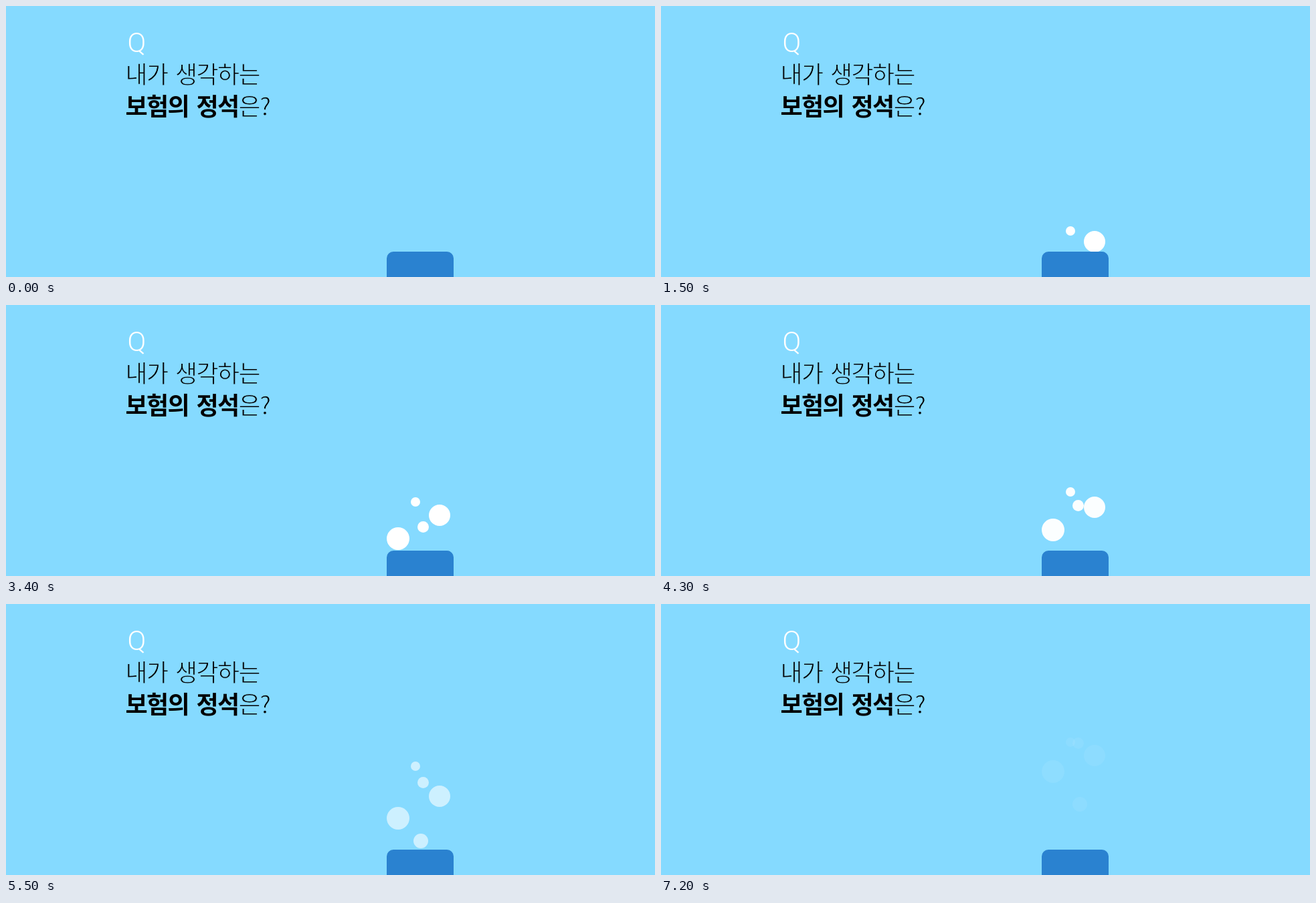
Write an HTML page that moves like this. It is 970 by 406 pixels and loops after 7.5 s.

```html
<!DOCTYPE html>
<html lang="ko">
<head>
<meta charset="utf-8">
<style>
  html, body { margin: 0; width: 100%; height: 100%; overflow: hidden; background: #85daff; }
  svg { display: block; }
  .title { font: 400 36px "Noto Sans CJK KR", "Noto Sans CJK JP", "Noto Sans CJK", sans-serif;
    letter-spacing: -1.6px; word-spacing: 3px; stroke: #85daff; stroke-width: 1px; }
  .title .bold { font-weight: 700; stroke: none; }
  .mark { font: 300 41px Roboto, sans-serif; font-stretch: 75%; fill: #fff; text-anchor: middle; }
</style>
</head>
<body>
<svg width="970" height="406" viewBox="0 0 970 406">
  <text class="mark" x="195.5" y="68.5">Q</text>
  <text class="title" x="178.5" y="116">내가 생각하는</text>
  <text class="title" x="178.5" y="164"><tspan class="bold">보험의 정석</tspan>은?</text>
  <g id="bubbles" fill="#fff"></g>
  <rect x="569" y="368" width="100" height="60" rx="10" fill="#2a82d0"/>
</svg>
<script>
  const STEP = 100, LOOP = 7500, LAST = 72;
  const keys = [0, 25, 42, 58, LAST];
  const alpha = [1, 1, 1, 0.5, 0.07];

  // Centre x and y may each be a constant or one value per key
  const bubbles = [
    { r: 7, x: 612, y: [379, 309, 283, 234, 207] },
    { r: 16, x: 648, y: [390.5, 328, 304, 284, 227] },
    { r: 17, x: 586, y: [428, 363, 338.5, 317.3, 251] },
    { r: 8.5, x: 623.5, y: [435, 365.5, 303.3, 259.4, 208] },
    { r: 11, x: [594, 594, 594, 626, 626], y: [430, 430, 387.5, 347, 300] }
  ];

  const group = document.getElementById("bubbles");
  for (const b of bubbles) {
    b.el = document.createElementNS("http://www.w3.org/2000/svg", "circle");
    b.el.setAttribute("r", b.r);
    group.append(b.el);
  }

  function at(values, n) {
    if (!Array.isArray(values)) return values;
    let i = 0;
    while (i < keys.length - 2 && n > keys[i + 1]) i++;
    const p = (n - keys[i]) / (keys[i + 1] - keys[i]);
    return values[i] + (values[i + 1] - values[i]) * p;
  }

  const snap = (v, r) => Math.round(v - r) + r;

  function draw(now) {
    const n = Math.min(LAST, Math.floor((now % LOOP) / STEP));
    for (const b of bubbles) {
      b.el.setAttribute("cx", snap(at(b.x, n), b.r));
      b.el.setAttribute("cy", snap(at(b.y, n), b.r));
      b.el.setAttribute("opacity", at(alpha, n));
    }
  }

  let start;
  function tick(now) {
    start ??= now;
    draw(now - start);
    requestAnimationFrame(tick);
  }
  draw(0);
  requestAnimationFrame(tick);
</script>
</body>
</html>
```
